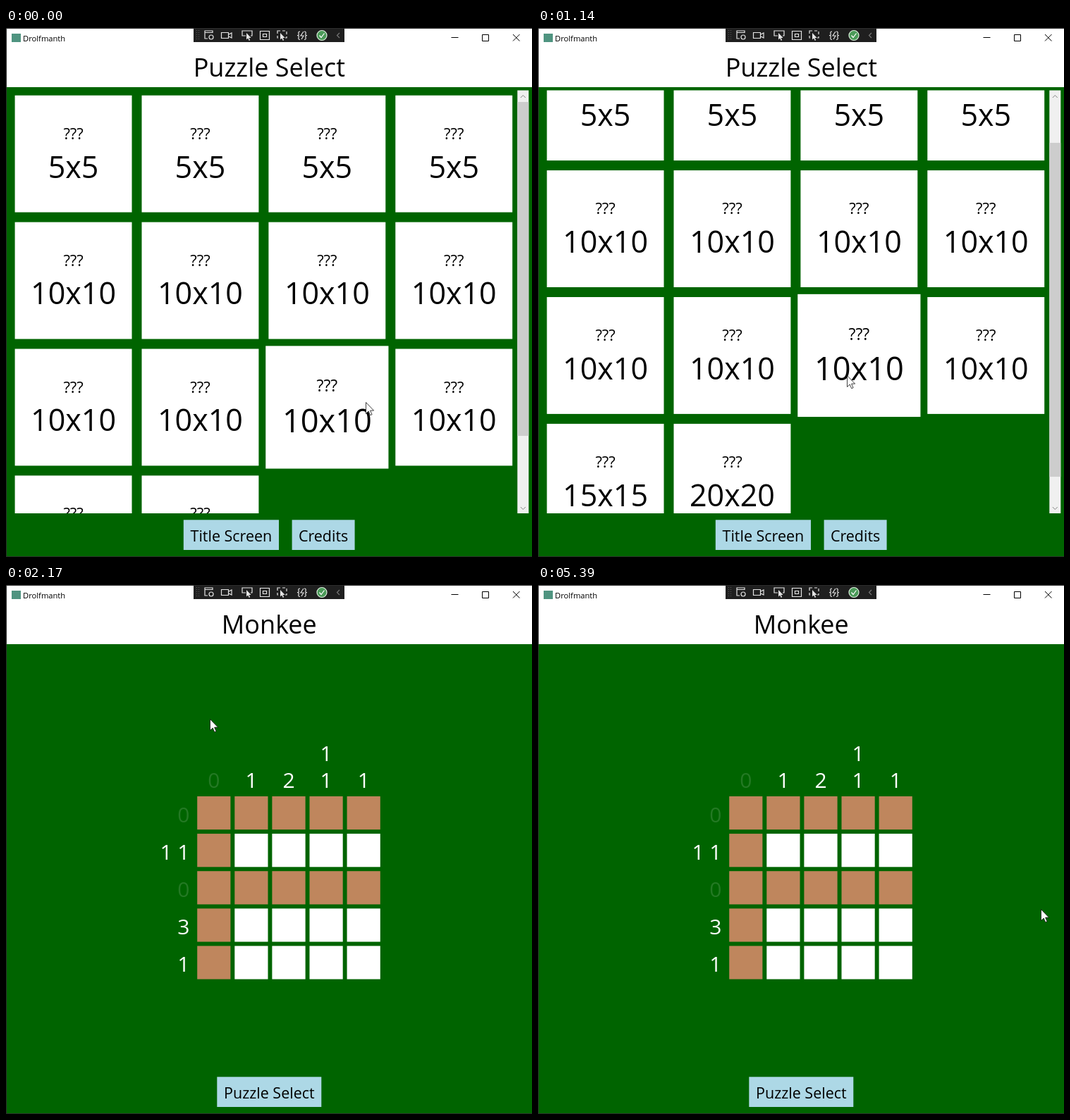
An HTML page that plays this animation: 746x751 px, repeating every 5460 ms.

```html
<!DOCTYPE html>
<html lang="en">
<head>
<meta charset="utf-8">
<title>Puzzle Select</title>
<style>
  html, body { margin: 0; width: 100%; height: 100%; overflow: hidden; background: #006400; }
  svg { display: block; font-family: "Open Sans", "Noto Sans", sans-serif; }
  .mid { text-anchor: middle; }
  .end { text-anchor: end; }
  .heading { font-size: 36px; }
  .label { font-size: 21.5px; }
  .hint { font-size: 22px; }
  .size { font-size: 43px; }
  .clue { font-size: 30px; fill: #fff; }
  .done { fill-opacity: .14; }
  .line { fill: none; stroke: #000; }
  .tools { fill: none; stroke: #e4e4e4; stroke-width: 1.2; }
  .solid { fill: #e4e4e4; stroke: none; }
</style>
</head>
<body>
<svg width="746" height="751" viewBox="0 0 746 751">
  <defs>
    <clipPath id="view"><rect y="88.5" width="725" height="600.5"/></clipPath>
    <path id="arrow" d="M0 0v16l3.700-3.500 2.500 5.700 2.400-1-2.500-5.600h5z"/>
    <path id="chevron" d="M-3.500 2L0-1.500 3.500 2"/>
  </defs>
  <rect width="746" height="84" fill="#fff"/>

  <rect x="8" y="8" width="13" height="12" fill="#4f9480"/>
  <text x="24" y="18.5" font-size="11.2">Drolfmanth</text>
  <path class="line" d="M631.500 13.500h10M675.500 9.500h9v9h-9zM719 9l9.500 9.500m0-9.500l-9.500 9.500"/>

  <rect x="266" width="214" height="20" fill="#1f1f1f"/>
  <g class="tools">
    <path d="M270.500 3v15m3-15v15" stroke="#555" stroke-dasharray="1 2"/>
    <path d="M286 15h-4V4h11v3m-11-.5h11"/>
    <circle cx="291" cy="13" r="3"/>
    <path d="M305.500 6.500h10v8h-10zM316 9l4-2v7l-4-2"/>
    <path d="M340 11h-5V4h14v7h-2"/>
    <use href="#arrow" class="solid" transform="translate(341 7) scale(.6)"/>
    <path d="M360.500 4.500h13v12h-13zm4 4h5v4h-5z"/>
    <rect x="385" y="4" width="13" height="10" stroke-dasharray="4 3"/>
    <use href="#arrow" class="solid" transform="translate(389 7) scale(.6)"/>
    <path d="M417 5q-3 0-2 3t-2 2.500q3 0 2 3t2 3m6-11.500q3 0 2 3t2 2.500q-3 0-2 3t-2 3m-1-11.500l-4 6h4l-3 5"/>
    <circle cx="448" cy="10.500" r="7" fill="#4a9a58" stroke="#dcefdc"/>
    <path d="M444.500 10.500l2.500 3 4.500-6" stroke="#fff"/>
    <use href="#chevron" transform="translate(471 10.500) rotate(-90)" stroke="#777"/>
  </g>

  <g id="menu">
    <text class="heading mid" x="373.3" y="69">Puzzle Select</text>
    <g clip-path="url(#view)"><g id="list"></g></g>
    <rect x="725.3" y="88.5" width="16" height="600.5" fill="#f0f0f0"/>
    <rect id="thumb" x="725.3" width="16" height="474" fill="#cdcdcd"/>
    <g class="line" style="stroke:#858585">
      <use href="#chevron" transform="translate(733.3 97)"/>
      <use href="#chevron" transform="translate(733.3 682) scale(1 -1)"/>
    </g>
  </g>
  <g id="puzzle">
    <text class="heading mid" x="373.3" y="69">Monkee</text>
  </g>
  <rect class="line" x=".5" y=".5" width="746" height="750" style="stroke:#2b2b2b"/>
  <use id="cursor" href="#arrow" fill="#fff" stroke="#111" stroke-width=".8"/>
</svg>
<script>
const LOOP = 5460, OPEN_AT = 1900;
const MAX_SCROLL = 119, WHEEL_STEP = 45.5, THUMB_TOP = 105, THUMB_TRAVEL = 94;
const CARD = 165.9, CARD_PITCH = 179.9, CELL = 47.2, CELL_PITCH = 53.1, HOVER = 1.05;
const $ = id => document.getElementById(id);

function add(parent, tag, attrs, text) {
  const node = document.createElementNS("http://www.w3.org/2000/svg", tag);
  for (const key in attrs) node.setAttribute(key, attrs[key]);
  if (text !== undefined) node.textContent = text;
  parent.append(node);
  return node;
}

function addBox(parent, x, y, size, fill) {
  const node = add(parent, "g", {});
  add(node, "rect", { x, y, width: size, height: size, fill });
  return { node, x, y, size };
}

function addButton(parent, x, width, label) {
  add(parent, "rect", { x, y: 698.3, width, height: 42.7, fill: "#add8e6" });
  add(parent, "text", { class: "label mid", x: x + width / 2, y: 728.5 }, label);
}

const addClue = (x, y, align, text) =>
  add($("puzzle"), "text", { class: `clue ${align}${text === "0" ? " done" : ""}`, x, y }, text);

const sizes = [...Array(4).fill("5x5"), ...Array(8).fill("10x10"), "15x15", "20x20"];
const cards = sizes.map((size, i) => {
  const x = 12.6 + CARD_PITCH * (i % 4), y = 95.7 + CARD_PITCH * Math.floor(i / 4);
  const card = addBox($("list"), x, y, CARD, "#fff");
  add(card.node, "text", { class: "hint mid", x: x + CARD / 2, y: y + 62 }, "???");
  add(card.node, "text", { class: "size mid", x: x + CARD / 2, y: y + 116.8 }, size);
  return card;
});
addButton($("menu"), 251.8, 135.2, "Title Screen");
addButton($("menu"), 405.6, 89, "Credits");

const columns = ["0", "1", "2", "1 1", "1"], rows = ["0", "1 1", "0", "3", "1"];
const cells = rows.flatMap((row, r) => columns.map((column, c) =>
  addBox($("puzzle"), 271.2 + CELL_PITCH * c, 300 + CELL_PITCH * r, CELL,
    row === "0" || column === "0" ? "#bf865d" : "#fff")));
columns.forEach((clue, c) => clue.split(" ").reverse().forEach((n, i) =>
  addClue(294.9 + CELL_PITCH * c, 287.5 - 38 * i, "mid", n)));
rows.forEach((clue, r) => addClue(260.5, 336.5 + CELL_PITCH * r, "end", clue));
addButton($("puzzle"), 299.3, 148, "Puzzle Select");

// Pointer strokes: start, end, destination; it rests in between
const home = [510, 531];
const strokes = [
  [0, 270, 545, 528], [270, 600, 438, 493], [1280, 1770, 289, 190], [2170, 2590, 380, 278],
  [3310, 3380, 381, 288], [3380, 3560, 350, 400], [3560, 3870, 505, 440],
  [3870, 4430, 295, 450], [4430, 4980, 666, 522], [4980, 5390, 713, 460]
];
const wheelDown = [670, 870, 940], wheelUp = [1140, 1220, 1280];

function pointerAt(t) {
  let [x, y] = home;
  for (const [start, end, toX, toY] of strokes) {
    const k = Math.min(1, Math.max(0, (t - start) / (end - start)));
    const ease = k * k * (3 - 2 * k);
    x += (toX - x) * ease;
    y += (toY - y) * ease;
  }
  return [x, y];
}

function scrollAt(t) {
  const ticks = times => times.filter(time => time <= t).length;
  const down = Math.min(MAX_SCROLL, ticks(wheelDown) * WHEEL_STEP);
  return Math.max(0, down - ticks(wheelUp) * WHEEL_STEP);
}

function hover(boxes, px, py) {
  for (const { node, x, y, size } of boxes) {
    const inside = px >= x && px <= x + size && py >= y && py <= y + size;
    const cx = x + size / 2, cy = y + size / 2;
    node.setAttribute("transform", inside
      ? `translate(${cx} ${cy}) scale(${HOVER}) translate(${-cx} ${-cy})` : "");
  }
}

function draw(now) {
  const t = now % LOOP;
  const [x, y] = pointerAt(t);
  const scroll = scrollAt(t);
  const playing = t >= OPEN_AT;
  $("menu").style.display = playing ? "none" : "";
  $("puzzle").style.display = playing ? "" : "none";
  $("list").setAttribute("transform", `translate(0 ${-scroll})`);
  $("thumb").setAttribute("y", THUMB_TOP + scroll / MAX_SCROLL * THUMB_TRAVEL);
  if (playing) hover(cells, x, y);
  else hover(cards, x, y + scroll);
  $("cursor").setAttribute("transform", `translate(${Math.round(x) + .5} ${Math.round(y) + .5})`);
}

const start = performance.now();
function tick() {
  draw(performance.now() - start);
  requestAnimationFrame(tick);
}
tick();
</script>
</body>
</html>
```
